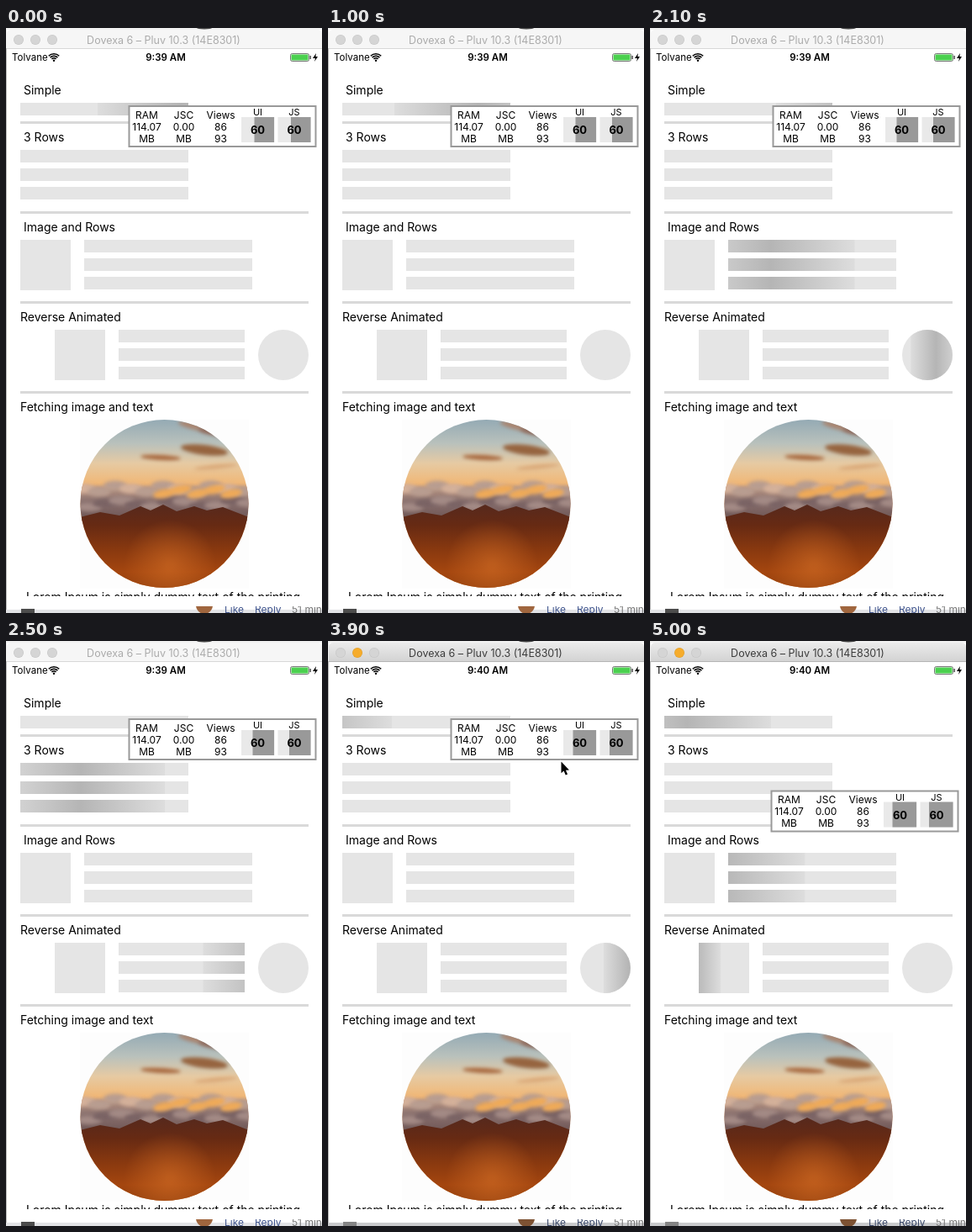
Write an HTML page with a canvas that moves like this. It is 376 by 696 pixels and loops after 5100 ms.

```html
<!DOCTYPE html>
<html lang="en">
<head>
<meta charset="utf-8">
<title>Shimmer placeholders</title>
<style>
  html, body { margin: 0; width: 100%; height: 100%; overflow: hidden; background: #fff; }
  canvas { display: block; width: 376px; height: 696px; }
</style>
</head>
<body>
<canvas id="stage" width="376" height="696"></canvas>
<script>
const ctx = document.getElementById('stage').getContext('2d');
const LOOP = 5100, STEP = 100;
const FONT = 'Inter, "Open Sans", sans-serif';

function box(x, y, w, h, fill) {
  ctx.fillStyle = fill;
  ctx.fillRect(x, y, w, h);
}

function disc(x, y, r, fill) {
  ctx.fillStyle = fill;
  ctx.beginPath();
  ctx.arc(x, y, r, 0, Math.PI * 2);
  ctx.fill();
}

function blob(x, y, rx, ry, fill, tilt = 0) {
  ctx.fillStyle = fill;
  ctx.beginPath();
  ctx.ellipse(x, y, rx, ry, tilt, 0, Math.PI * 2);
  ctx.fill();
}

function polygon(points, fill) {
  ctx.fillStyle = fill;
  ctx.beginPath();
  points.forEach(([x, y]) => ctx.lineTo(x, y));
  ctx.closePath();
  ctx.fill();
}

function label(text, x, y, size, { color = '#000', align = 'left', weight = 400 } = {}) {
  ctx.font = `${weight} ${size}px ${FONT}`;
  ctx.textAlign = align;
  ctx.fillStyle = color;
  ctx.fillText(text, x, y);
}

function clipped(path, draw) {
  ctx.save();
  ctx.beginPath();
  path();
  ctx.clip();
  draw();
  ctx.restore();
}

function verticalGradient(top, bottom, stops) {
  const g = ctx.createLinearGradient(0, top, 0, bottom);
  stops.forEach(([at, color]) => g.addColorStop(at, color));
  return g;
}

const clamp = v => Math.min(1, Math.max(0, v));
const mix = (a, b, k) => a + (b - a) * k;
const easeIn = p => p ** 1.7;
const easeInOut = p => p < 0.5 ? easeIn(2 * p) / 2 : 1 - easeIn(2 - 2 * p) / 2;

// Groups of placeholders that take turns shining.
const groups = [
  { start: 689, period: 1028, duration: 520, x: 17, w: 200, h: 15, ys: [89] },
  { start: 206, period: 1028, duration: 520, x: 17, w: 200, h: 15, ys: [145, 167, 189] },
  { start: 1500, period: 1478, duration: 400, x: 17, w: 60, h: 60, ys: [252] },
  { start: 1880, period: 1478, duration: 520, x: 93, w: 200, h: 15, ys: [252, 274, 296] },
  { start: 36, period: 1849, duration: 480, x: 300, w: 60, h: 60, ys: [359], round: true, reverse: true },
  { start: 526, period: 1849, duration: 480, x: 134, w: 150, h: 15, ys: [359, 381, 403], reverse: true },
  { start: 990, period: 1849, duration: 450, x: 58, w: 60, h: 60, ys: [359], reverse: true }
];

function drawPlaceholder(group, y, p) {
  const { x, w, h, round, reverse } = group;
  const outline = () => round ? ctx.arc(x + w / 2, y + h / 2, w / 2, 0, Math.PI * 2) : ctx.rect(x, y, w, h);
  clipped(outline, () => {
    box(x, y, w, h, '#e5e5e5');
    if (p >= 1) return;
    const travel = easeInOut(reverse ? 1 - p : p);
    const left = x + w * (2 * travel - 1);
    const shine = ctx.createLinearGradient(left - 0.1 * w, 0, left + 1.1 * w, 0);
    shine.addColorStop(0, '#e5e5e5');
    shine.addColorStop(0.5, '#b5b5b5');
    shine.addColorStop(1, '#e5e5e5');
    box(left, y, w, h, shine);
  });
}

function drawPlaceholders(t) {
  for (const group of groups) {
    const { start, period, duration, ys } = group;
    const since = ((t - start) % period + period) % period;
    ys.forEach(y => drawPlaceholder(group, y, since / duration));
  }
}

function drawClouds() {
  ctx.save();
  ctx.filter = 'blur(2px)';
  blob(238, 476, 34, 5, '#a98570', 0.2);
  blob(252, 482, 24, 4, '#8d6d61', 0.2);
  blob(236, 502, 28, 6, '#96643f', 0.12);
  blob(184, 511, 24, 3, '#a8683e', 0.05);
  blob(250, 522, 26, 2.5, '#d9a878', -0.1);
  box(80, 546, 217, 44, verticalGradient(546, 586, [[0, '#b99580'], [0.4, '#8d7471'], [1, '#6a5252']]));
  for (let i = 0; i < 11; i++) {
    const x = 92 + i * 19;
    blob(x, 548 + 4 * Math.sin(i * 2.1), 14, 6, i % 3 ? '#b89d90' : '#d3b09a');
    blob(x + 7, 566 + 4 * Math.cos(i * 1.7), 15, 5, i % 2 ? '#7a6364' : '#a38a85');
  }
  for (let i = 0; i < 5; i++) blob(188 + i * 20, 554 - (i % 2) * 5, 13, 5, '#efaa58', -0.2);
  ctx.restore();
}

function drawPhoto() {
  box(88, 466, 201, 201, '#fdfdfd');
  clipped(() => ctx.arc(188.5, 566, 100, 0, Math.PI * 2), () => {
    box(88, 466, 201, 201, verticalGradient(466, 560, [
      [0, '#94aab4'], [0.3, '#b9c1bc'], [0.55, '#e6caa3'], [0.8, '#f0b878'], [1, '#e2a068']
    ]));
    drawClouds();
    polygon([[88, 582], [112, 576], [135, 580], [160, 569], [172, 574], [187, 567], [203, 575],
      [224, 569], [239, 574], [258, 570], [289, 582], [289, 667], [88, 667]],
    verticalGradient(567, 667, [[0, '#56291d'], [0.25, '#672a13'], [0.55, '#8a390f'], [0.8, '#a4460f'], [1, '#93400e']]));
    const glow = ctx.createRadialGradient(195, 640, 4, 195, 640, 55);
    glow.addColorStop(0, 'rgba(205,105,35,.65)');
    glow.addColorStop(1, 'rgba(205,105,35,0)');
    box(88, 580, 201, 87, glow);
  });
}

function drawWindow(active) {
  box(0, 0, 376, 696, '#f1f1f1');
  blob(236, 0, 9, 1.5, '#444');
  box(1, 2, 375, 690, '#fff');
  box(0, 24, 1, 668, '#bdbdbd');
  const bar = active ? verticalGradient(2, 25, [[0, '#ebebeb'], [1, '#d2d2d2']]) : '#f6f6f6';
  ctx.fillStyle = bar;
  ctx.beginPath();
  ctx.roundRect(1, 2, 375, 23, [5, 5, 0, 0]);
  ctx.fill();
  box(1, 24, 375, 1, active ? '#b5b5b5' : '#d8d8d8');
  [15, 35, 55].forEach((x, i) => {
    const lit = active && i === 1;
    disc(x, 14, 6, lit ? '#dda032' : '#c6c6c6');
    disc(x, 14, 5.4, lit ? '#f6ac2c' : '#d5d5d5');
  });
  label('Dovexa 6 – Pluv 10.3 (14E8301)', 187.5, 19, 12.5, { color: active ? '#3c3c3c' : '#ababab', align: 'center' });
}

function drawBehind(active) {
  clipped(() => ctx.rect(0, 688, 376, 8), () => {
    box(0, 692, 376, 4, active ? '#c9cacc' : '#e2e3e6');
    box(18, 691, 16, 5, active ? '#858585' : '#4c4c4c');
    disc(236, 687, 10, active ? '#7d5233' : '#a0663e');
    const link = { color: active ? '#3a4869' : '#40558d' };
    label('Like', 260, 695.5, 12, link);
    label('Reply', 296, 695.5, 12, link);
    label('51 min', 340, 695.5, 12, { color: '#777' });
  });
}

function drawStatus(t) {
  label('Tolvane', 7, 39, 11.5);
  ctx.strokeStyle = '#000';
  ctx.lineWidth = 1.6;
  [3.6, 6.2, 8.8].forEach(r => {
    ctx.beginPath();
    ctx.arc(57, 39.5, r, -Math.PI * 0.75, -Math.PI * 0.25);
    ctx.stroke();
  });
  disc(57, 38.7, 1.2, '#000');
  label(t < 3500 ? '9:39 AM' : '9:40 AM', 190, 39, 11.5, { align: 'center', weight: 600 });
  ctx.strokeStyle = '#555';
  ctx.lineWidth = 0.8;
  ctx.beginPath();
  ctx.roundRect(338.5, 30.5, 22, 9, 2);
  ctx.stroke();
  box(339.5, 31.5, 20, 7, '#4bd04f');
  box(361.5, 33, 1.5, 4, '#555');
  polygon([[369, 30], [365, 36], [368, 36], [367, 40], [371, 34], [368.4, 34]], '#000');
}

function drawContent(t) {
  [['Simple', 21, 78.5], ['3 Rows', 21, 134.5], ['Image and Rows', 21, 241.5],
    ['Reverse Animated', 17, 348.5], ['Fetching image and text', 17, 455.5]
  ].forEach(([text, x, y]) => label(text, x, y, 14));
  [111, 218, 325, 432].forEach(y => box(17, y, 343, 3, '#d9d9d9'));
  drawPlaceholders(t);
  drawPhoto();
  clipped(() => ctx.rect(1, 667, 375, 9), () =>
    label('Lorem Ipsum is simply dummy text of the printing', 187, 682, 14, { align: 'center' }));
}

function monitorPosition(t) {
  const pull = clamp((t - 3900) / 400), settle = clamp((t - 4300) / 400);
  return { x: 145.5 - 1.5 * pull - 0.5 * settle, y: mix(92, 140, pull) + 37.5 * settle };
}

function drawMonitor(t) {
  const { x, y } = monitorPosition(t);
  const split = 15.5 - Math.floor(t / 850);
  ctx.save();
  ctx.translate(x, y);
  box(0, 0, 224, 50, '#999');
  box(2, 2, 220, 46, '#fff');
  [['RAM', '114.07', 'MB', 22], ['JSC', '0.00', 'MB', 66], ['Views', '86', '93', 110]
  ].forEach(([a, b, c, cx]) =>
    [a, b, c].forEach((text, i) => label(text, cx, 15.5 + 14 * i, 12, { align: 'center' })));
  [['UI', 134.5], ['JS', 178]].forEach(([name, gx]) => {
    label(name, gx + 19.5, 12, 11, { align: 'center' });
    box(gx, 14, 39.5, 30, '#e9e9e9');
    box(gx + split, 14, 39 - split, 30, '#999');
    label('60', gx + 19.5, 34, 13, { align: 'center', weight: 700 });
  });
  ctx.restore();
}

function drawCursor(t) {
  if (t < 3800 || t > 4700) return;
  const { x, y } = monitorPosition(t);
  ctx.save();
  ctx.translate(x + 132, y + 51.5);
  ctx.scale(0.92, 0.92);
  ctx.beginPath();
  [[0, 0], [0, 15], [3.3, 12], [5.7, 17.5], [8.2, 16.4], [5.9, 11.1], [10.3, 11]
  ].forEach(([px, py]) => ctx.lineTo(px, py));
  ctx.closePath();
  ctx.strokeStyle = '#fff';
  ctx.lineWidth = 2;
  ctx.stroke();
  ctx.fillStyle = '#000';
  ctx.fill();
  ctx.restore();
}

function render(t) {
  const active = t >= 3800;
  drawWindow(active);
  drawBehind(active);
  drawStatus(t);
  drawContent(t);
  drawMonitor(t);
  drawCursor(t);
}

const began = performance.now();
function tick() {
  const t = (performance.now() - began) % LOOP;
  render(Math.floor(t / STEP) * STEP);
  requestAnimationFrame(tick);
}
tick();
</script>
</body>
</html>
```
